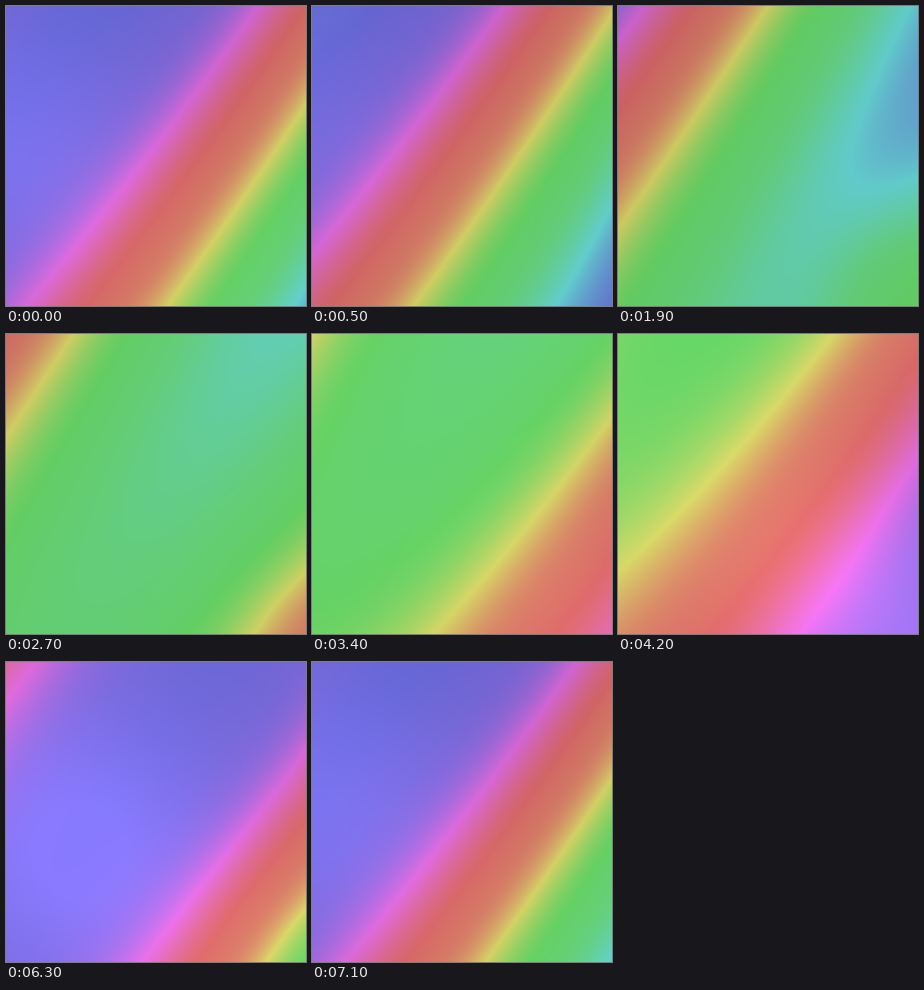
An HTML page with a canvas for the animation above (7.2 s loop, 300 px wide and 300 px high).

```html
<!DOCTYPE html>
<html lang="en">
<head>
<meta charset="utf-8">
<title>Drifting hues</title>
<style>
  html, body { margin: 0; width: 100%; height: 100%; overflow: hidden; }
  canvas { display: block; width: 100vw; height: 100vh; }
</style>
</head>
<body>
<canvas id="c" width="300" height="300"></canvas>
<script>
const SIZE = 300, LOOP = 7200, STEP = 100, SAT = 0.52;
const RAD = Math.PI / 180;

const ctx = document.getElementById('c').getContext('2d');
const image = ctx.createImageData(SIZE, SIZE);
const px = image.data;

const bump = (dx, dy, r) => Math.exp(-(dx * dx + dy * dy) / (2 * r * r));

// Every point swings around its own mean hue; the swing peaks later towards the top left.
function hueAt(x, y, angle) {
  const mean = -20 + 55 * x + 30 * y;
  const swing = 117 + 38 * x;
  const peak = 215 - 108 * x - 82 * y + 10 * x * y;
  const eddy = -40 * Math.sin(angle * RAD) ** 3 * bump(x - 0.97, y - 0.97, 0.2);
  return mean + swing * Math.cos((angle - peak) * RAD) + eddy;
}

// Widens red, green and blue, and narrows the colours between them.
const widen = h => h - 14 * Math.sin(3 * (h - 6) * RAD);

// A soft glow crosses from the bottom right to the left while it swells and fades.
function glowAt(angle) {
  const q = (angle + 260) % 360 / 360;
  return {
    x: 1.4 - 1.93 * q,
    y: 1.27 - 1.07 * q,
    gain: 0.1 * (1 - Math.cos(2 * Math.PI * q))
  };
}

// One HSV channel; sector is 5, 3, 1 for red, green, blue.
function channel(sector, hue, value) {
  const k = (sector + hue / 60 + 12) % 6;
  return 255 * value * (1 - SAT * Math.max(0, Math.min(k, 4 - k, 1)));
}

function draw(t) {
  const angle = t / LOOP * 360;
  const glow = glowAt(angle);
  const base = 0.82 - 0.03 * Math.cos((angle - 75) * RAD);

  for (let i = 0, o = 0; i < SIZE * SIZE; i++, o += 4) {
    const x = (i % SIZE + 0.5) / SIZE;
    const y = (Math.floor(i / SIZE) + 0.5) / SIZE;
    const hue = widen(hueAt(x, y, angle));
    const value = Math.min(1, base + glow.gain * bump(x - glow.x, y - glow.y, 0.32));
    px[o] = channel(5, hue, value);
    px[o + 1] = channel(3, hue, value);
    px[o + 2] = channel(1, hue, value);
    px[o + 3] = 255;
  }
  ctx.putImageData(image, 0, 0);
}

const start = performance.now();
let shown = -1;
function tick() {
  const t = Math.floor((performance.now() - start) % LOOP / STEP) * STEP;
  if (t !== shown) draw(shown = t);
  requestAnimationFrame(tick);
}
tick();
</script>
</body>
</html>
```
